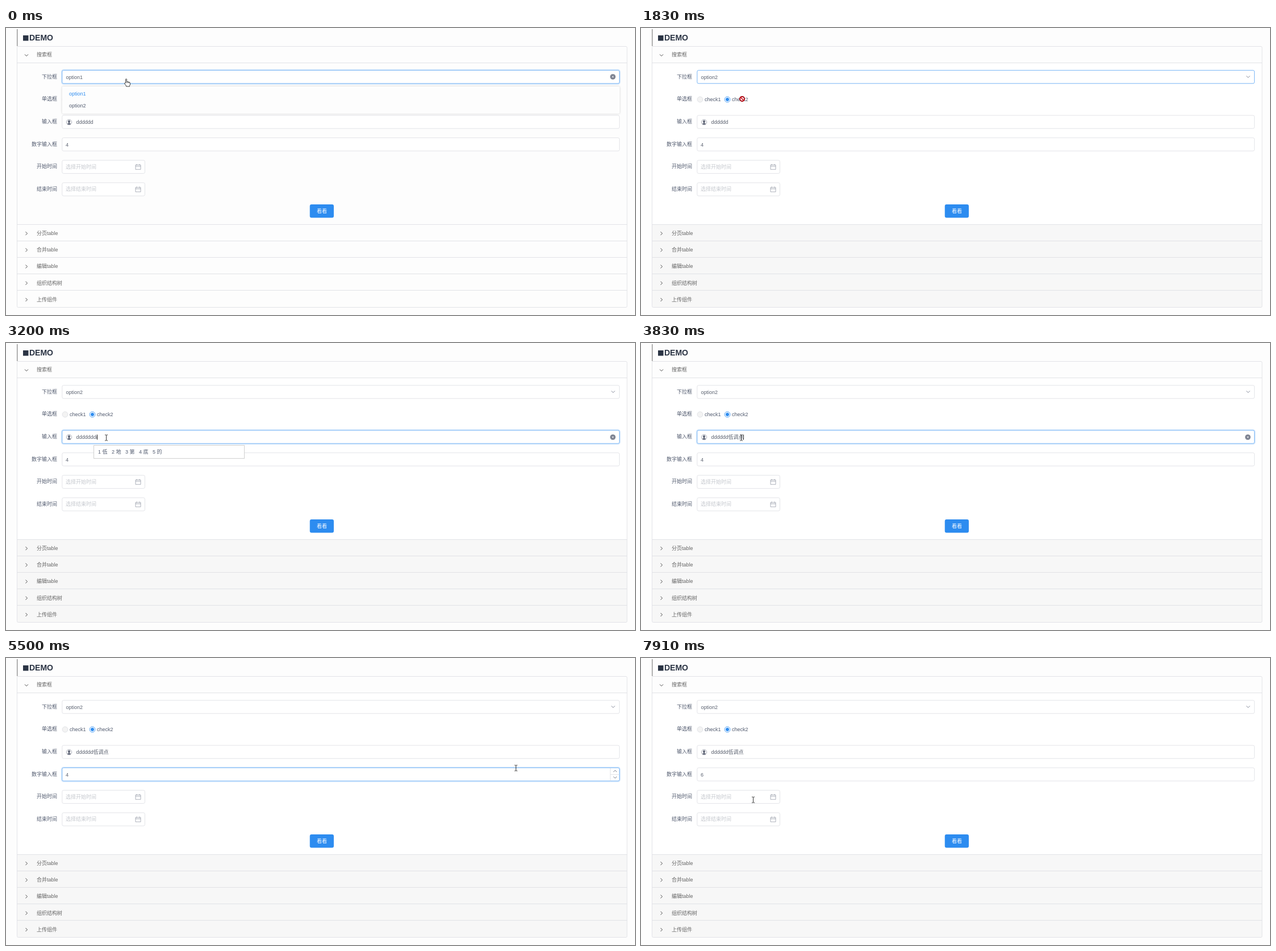
An HTML page for the animation above (8000 ms loop, 1107x506 px).

```html
<!DOCTYPE html>
<html lang="zh-CN">
<head>
<meta charset="utf-8">
<title>DEMO</title>
<style>
  html, body { margin: 0; width: 100%; height: 100%; overflow: hidden; background: #fdfdfd; }
  svg { display: block; }
  text { font: 9px "Liberation Sans", "Noto Sans CJK SC", "Noto Sans CJK", sans-serif; fill: #515a6e; white-space: pre; }
  .value { fill: #5b6270; }
  .hint { fill: #c5c8ce; }
  .head { fill: #666; }
  .line { fill: none; stroke: #dcdee2; stroke-width: .8; }
  .icon { fill: none; stroke: #808695; }
  .head-icon { fill: none; stroke: #4d4d4d; }
  .field { fill: #fff; stroke: #dcdee2; stroke-width: .8; }
  .hover { stroke: #57a3f3; }
  .glow { fill: none; stroke: #2d8cf0; stroke-opacity: .2; stroke-width: 1.5; }
</style>
</head>
<body>
<svg id="stage" width="1107" height="506" viewBox="0 0 1107 506"></svg>
<script>
const LOOP = 8000;
const stage = document.getElementById('stage');

const text = (x, y, s, attrs = '') => `<text x="${x}" y="${y}" ${attrs}>${s}</text>`;
const label = (y, s) => text(90, y, s, 'text-anchor="end"');
const path = (d, attrs = 'class="icon"') => `<path d="${d}" ${attrs}/>`;
const chevron = (x, y, angle = 0, style = 'icon') =>
  path('M-3-1.5L0 1.5L3-1.5', `class="${style}" transform="translate(${x} ${y}) rotate(${angle})"`);
// Fields are placed by their outer edge; the border lies inside it.
const box = (y, width, attrs = '') =>
  `<rect class="field" x="98.8" y="${y + .4}" width="${width - .8}" height="23.2" rx="2.5" ${attrs}/>`;
const field = (id, y) =>
  `<rect id="${id}Glow" class="glow" x="97.7" y="${y - .7}" width="983" height="25.4" rx="3.5"/>`
  + box(y, 981.6, `id="${id}"`);
const clearIcon = (id, y) =>
  `<g id="${id}"><circle cx="1068" cy="${y}" r="4.8" fill="#7b8190"/>
   ${path(`M1066.3 ${y - 1.7}l3.4 3.4m0-3.4l-3.4 3.4`, 'stroke="#fff" stroke-width=".8"')}</g>`;
const dateField = (y, name, hint) => label(y + 14.3, name) + box(y, 146.4)
  + text(105, y + 14.7, hint, 'class="hint"')
  + path(`M228 ${y + 8.7}h9v7.8h-9zM228 ${y + 11.2}h9M230 ${y + 7.2}v2M235 ${y + 7.2}v2`, 'class="icon" stroke-width=".8" opacity=".8"');

const panels = ['分页table', '合并table', '编辑table', '组织结构树', '上传组件'];

stage.innerHTML = `
  <rect width="1107" height="506" fill="#fdfdfd"/>
  <rect x="19" y="2" width="1.5" height="30" fill="#999"/>
  <rect x="30" y="13" width="9.5" height="9.5" fill="#2b3444"/>
  ${text(41, 21.7, 'DEMO', 'style="font-size:14px;font-weight:bold;fill:#2b3444"')}
  <rect id="content" x="20" y="62" width="1073" height="284"/>
  <rect id="panels" x="20" y="347" width="1073" height="145"/>
  ${path('M19.5 61.5H1093' + panels.map((s, i) => `M19.5 ${Math.round(346.5 + 29.2 * i) - .5}H1093`).join(''), 'class="line"')}
  <rect class="line" x="19.5" y="32.5" width="1073.5" height="460" rx="2"/>
  ${chevron(36, 48, 0, 'head-icon')}${text(54, 50.3, '搜索框', 'class="head"')}
  ${panels.map((s, i) => chevron(36, 362.2 + 29.2 * i, -90, 'head-icon') + text(54, 365 + 29.2 * i, s, 'class="head"')).join('')}

  ${label(89, '下拉框')}${field('select', 74.2)}
  ${text(105.5, 90, '', 'id="choice" class="value"')}
  ${path('M135.5 82v9', 'id="selectCaret" stroke="#333"')}
  ${clearIcon('selectClear', 86)}<g id="selectArrow">${chevron(1068.5, 86)}</g>

  ${label(128.3, '单选框')}
  <circle cx="104" cy="126" r="4.9" fill="#f3f3f3" stroke="#dcdee2" stroke-width=".8"/>
  ${text(112, 129.3, 'check1')}
  <circle cx="152" cy="126" r="4.9" fill="#fff" stroke="#2d8cf0" stroke-width=".8"/>
  <circle cx="152" cy="126" r="3" fill="#2d8cf0"/>
  ${text(160, 129.3, 'check2')}

  ${label(168.3, '输入框')}${field('input', 153.6)}
  <circle cx="111" cy="166" r="4.7" fill="#fff" stroke="#9a9eaa" stroke-width=".8"/>
  ${path('M107.8 169.4Q108.2 168 110 167.7V167Q108.8 166 108.8 164.4Q109 162.4 111 162.4Q113 162.4 113.2 164.4Q113.2 166 112 167V167.7Q113.8 168 114.2 169.4Q111 171.6 107.8 169.4Z', 'fill="#686e7e"')}
  ${text(123.5, 169, '', 'id="typed" class="value"')}
  ${path('M0 161.5v9', 'id="inputCaret" stroke="#333"')}
  ${clearIcon('inputClear', 166)}

  ${label(207.5, '数字输入框')}${field('number', 193.2)}
  ${text(105, 208.8, '', 'id="count" class="value"')}
  ${path('M110.5 200.5v9', 'id="numberCaret" stroke="#333"')}
  <g id="spinner">${path('M1063.5 194v22.6M1063.5 205.5h16', 'class="line"')}
    <g id="up">${chevron(1072, 199.5, 180)}</g>${chevron(1072, 210.5)}</g>

  ${dateField(232.8, '开始时间', '选择开始时间')}
  ${dateField(272.4, '结束时间', '选择结束时间')}
  <rect x="534.7" y="311" width="42.2" height="23.6" rx="3" fill="#2d8cf0"/>
  ${text(556, 326, '看看', 'text-anchor="middle" style="fill:#fff;font-weight:500"')}

  <g id="dropdown">
    <rect x="98.7" y="0" width="981.3" height="48" rx="2" fill="#fdfdfd" style="filter:drop-shadow(0 .7px 1.5px rgba(0,0,0,.2))"/>
    ${text(111, 16, 'option1', 'id="option1"')}${text(111, 37, 'option2', 'id="option2"')}
  </g>
  <g id="ime">
    <rect x="154.5" y="180.5" width="265" height="23" fill="#fff" stroke="#d0d0d0"/>
    ${text(162, 195.3, '', 'id="candidates"')}
  </g>
  <g id="cursor"></g>`;

const ui = {};
stage.querySelectorAll('[id]').forEach(el => ui[el.id] = el);

const cursors = {
  hand: path('M-3 1V-5.3a1 1 0 0 1 2 0V-1.6l4.6 1.1q1.4.5 1.4 2V3q0 1.5-1 2.7V7H-2V5.8L-4.8 2.2q-.3-1.6 1-1.4z', 'fill="#fff" stroke="#222" stroke-width=".9"')
    + path('M-1-1.5V1.2M1.2-1V1.2M3.2-.4V1.5', 'stroke="#222" stroke-width=".7"'),
  beam: path('M-2.5-5H-.6L0-4.5L.6-5H2.5M0-4.5V4.5M-2.5 5H-.6L0 4.5L.6 5H2.5', 'fill="none" stroke="#222" stroke-width=".9"'),
  ban: '<circle r="4" fill="#fff" stroke="#400" stroke-width="2"/><circle r="4" fill="none" stroke="#d51624" stroke-width="1.5"/>'
    + path('M-2.8-2.8L2.8 2.8', 'stroke="#d51624" stroke-width="1.7"'),
  arrow: path('M-3-6V5L-.6 2.8L1 6.3L2.6 5.5L1 2.2H4.4Z', 'fill="#fff" stroke="#222" stroke-width=".8"')
};

// The pointer is sampled coarsely: [time, shape, x, y], each held until the next.
const pointer = [
  [0, 'hand', 213.5, 96], [120, 'hand', 204, 112], [630, 'hand', 186, 130], [820, 'hand', 178, 133],
  [1000, 'ban', 174, 115], [1700, 'ban', 176, 119], [1830, 'ban', 178, 125], [1950, 'ban', 179, 129],
  [2250, 'ban', 180, 132], [2400, 'arrow', 180, 145], [2530, 'beam', 178, 160], [2680, 'beam', 176.5, 167],
  [4110, 'beam', 177, 172], [4250, 'arrow', 180, 186], [4400, 'beam', 184, 209], [4540, 'arrow', 186, 225],
  [4680, 'beam', 186, 211], [4980, 'beam', 230, 209], [5120, 'beam', 400, 206],
  [5260, 'beam', 650, 201], [5380, 'beam', 810, 197], [5500, 'beam', 897.5, 194], [5620, 'beam', 960, 195],
  [5760, 'beam', 1010, 197], [5900, 'beam', 1045, 200], [6040, 'hand', 1067, 203], [6290, 'hand', 1071, 205],
  [6410, 'hand', 1072, 208], [7370, 'arrow', 1045, 229],
  [7520, 'arrow', 760, 250], [7650, 'arrow', 430, 261], [7780, 'beam', 238, 252], [7910, 'beam', 197.5, 250]
];
const composition = [[0, ''], [3200, 'di'], [3350, "di'diao"], [3550, "di'diao'dian"], [3830, '低调点']];
const counter = [[0, 4], [7100, 5], [7240, 6]];

const at = (steps, t) => steps.findLast(step => step[0] <= t);
const show = (id, on) => ui[id].style.display = on ? '' : 'none';
const setText = (id, s) => { if (ui[id].textContent !== String(s)) ui[id].textContent = s; };
const within = (t, from, to) => t >= from && t < to;
const focus = (id, active, glow) => {
  ui[id].classList.toggle('hover', active);
  show(id + 'Glow', glow);
};

let shape;
function draw(t) {
  const chosen = t >= 820;
  ui.content.setAttribute('fill', chosen ? '#fff' : '#fdfdfd');
  ui.panels.setAttribute('fill', chosen ? '#f7f7f7' : '#fdfdfd');

  focus('select', t < 2860, t < 1000);
  setText('choice', chosen ? 'option2' : 'option1');
  show('selectClear', t < 1000);
  show('selectArrow', t >= 1000);
  show('selectCaret', within(t, 1000, 1430) || within(t, 1950, 2400));

  const closing = t >= 1000;
  show('dropdown', t < 1280);
  ui.dropdown.setAttribute('transform', `translate(0 103) scale(1 ${closing ? .87 : 1})`);
  ui.dropdown.setAttribute('opacity', closing ? .3 : 1);
  ui.option1.style.fill = chosen && !closing ? '' : '#2d8cf0';
  ui.option2.style.fill = chosen ? '#2d8cf0' : '';

  focus('input', within(t, 2530, 4680), within(t, 2860, 4680));
  show('inputClear', within(t, 2530, 4250));
  setText('typed', 'dddddd' + at(composition, t)[1]);
  show('inputCaret', within(t, 2860, 4250));
  ui.inputCaret.setAttribute('transform', `translate(${Math.round(123.5 + ui.typed.getComputedTextLength()) - .5} 0)`);
  show('ime', within(t, 3200, 3830));
  setText('candidates', t < 3350 ? '1 低   2 地   3 第   4 底   5 的' : t < 3550 ? '1 低调   2 地调   3 低   4 地   5 第' : '1 低调点   2 低调   3 低   4 地   5 第');

  focus('number', within(t, 4400, 7520), within(t, 4680, 7370));
  setText('count', at(counter, t)[1]);
  show('numberCaret', within(t, 4680, 5260) || within(t, 5760, 6290));
  show('spinner', within(t, 4400, 4540) || within(t, 4680, 7370));
  ui.up.firstElementChild.style.stroke = within(t, 6040, 7370) ? '#2d8cf0' : '';

  const [, kind, x, y] = at(pointer, t);
  if (kind !== shape) ui.cursor.innerHTML = cursors[shape = kind];
  ui.cursor.setAttribute('transform', `translate(${x} ${y})`);
}

function tick() {
  draw(performance.now() % LOOP);
  requestAnimationFrame(tick);
}
tick();
</script>
</body>
</html>
```
